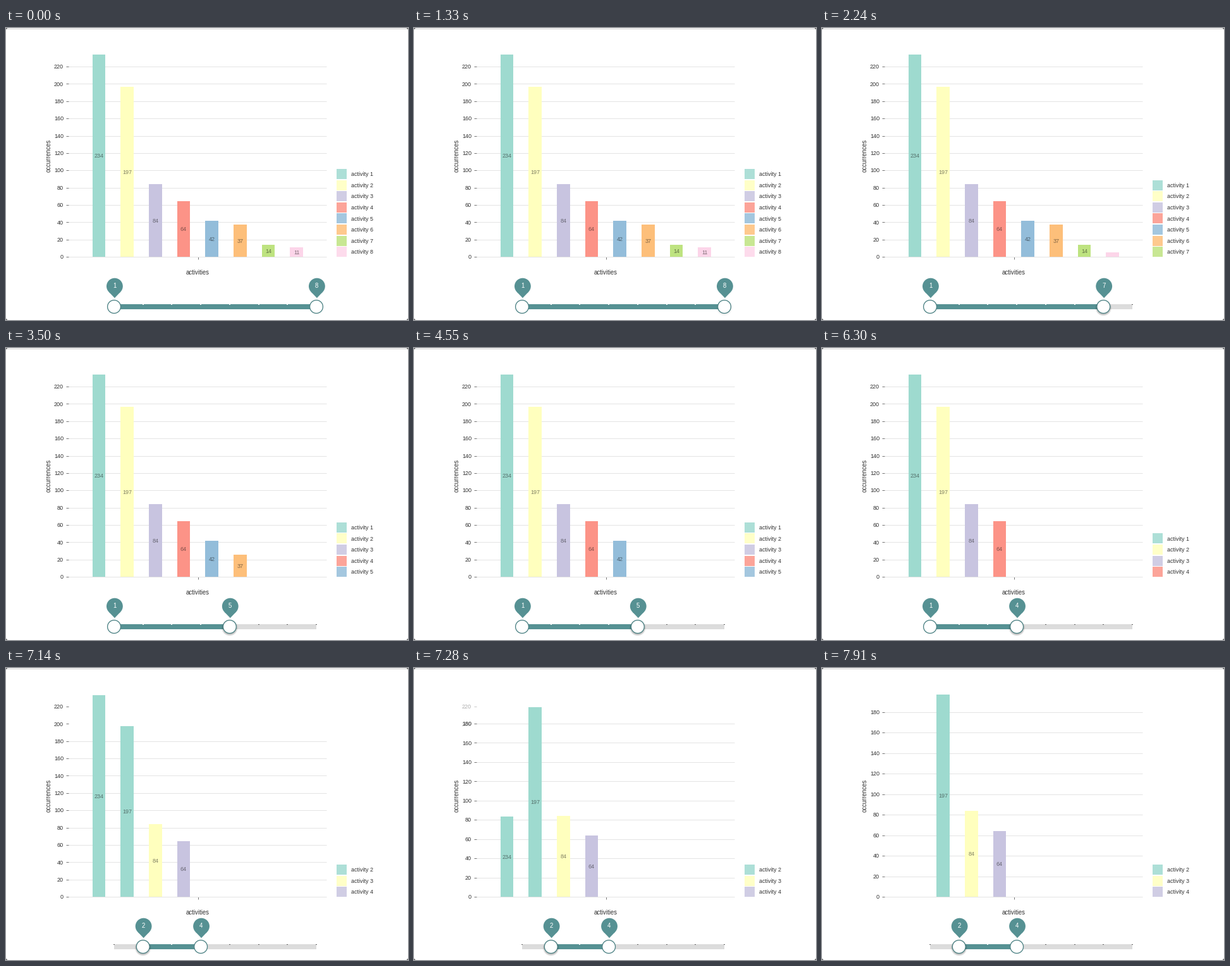
A matplotlib script that plays this animation: 636x462 px, repeating every 8 s.

```python
import matplotlib.pyplot as plt
from matplotlib.animation import FuncAnimation
from matplotlib.colors import to_rgb
from matplotlib.patches import Circle, Polygon, Rectangle

W, H, DPI = 636, 462, 64
PX = 72 / DPI
LOOP, STEP = 8000, 40
EASE_MS = 350

VALUES = [234, 197, 84, 64, 42, 37, 14, 11]
PALETTE = ["#8dd3c7", "#ffffb3", "#bebada", "#fb8072",
           "#80b1d3", "#fdb462", "#b3de69", "#fccde5"]
TEAL, TRACK, INK = "#569193", "#dcdcdc", "#333333"
BASE, PLOT_H = 362, 320
TICKS = range(0, 221, 20)

# start ms, first and last activity, delay before the bars move
EVENTS = [(-1000, 1, 8, 0), (1680, 1, 7, 379), (2590, 1, 6, 0),
          (3330, 1, 5, 0), (4550, 1, 4, 0), (4936, 1, 3, 0),
          (5870, 1, 4, 0), (7092, 2, 4, 0)]

plt.rcParams["font.family"] = "Liberation Sans"
fig = plt.figure(figsize=(W / DPI, H / DPI), dpi=DPI, facecolor="white")
ax = fig.add_axes([0, 0, 1, 1])
ax.set_xlim(0, W)
ax.set_ylim(H, 0)
ax.axis("off")


def tint(color, alpha):
    return tuple(1 - alpha * (1 - c) for c in to_rgb(color))


def ease(u):
    u = min(max(u, 0), 1)
    return 4 * u ** 3 if u < 0.5 else 1 - 4 * (1 - u) ** 3


def mix(a, b, p):
    return a + (b - a) * p


def label(x, y, s, size=9, color=INK, ha="center", z=5, **kw):
    return ax.text(x, y + 0.36 * size, s, fontsize=size * PX, color=color,
                   ha=ha, va="baseline", zorder=z, **kw)


def rect(x, y, w, h, color, z=2):
    return ax.add_patch(Rectangle((x, y), w, h, fc=color, lw=0, zorder=z))


def line(xs, ys, color, z=1):
    return ax.plot(xs, ys, color=color, lw=PX, solid_capstyle="butt", zorder=z)[0]


def knob_x(n):
    return 171 + (n - 1) * 320 / 7


class Tick:
    def __init__(self, value):
        self.value = value
        self.grid = line([99, 507], [0, 0], "#e4e4e4")
        self.mark = line([95, 99], [0, 0], "#777777")
        self.text = label(91, 0, str(value), ha="right")

    def update(self, before, after, p):
        live = self.value <= after[0]
        y = BASE - self.value * (mix(before[1], after[1], p) if live else before[1])
        alpha = 1 if live else 1 - p
        self.grid.set_ydata([y, y])
        self.grid.set_visible(live)
        self.mark.set_ydata([y, y])
        self.mark.set_alpha(alpha)
        self.text.set_y(y + 3.24)
        self.text.set_alpha(alpha)


class Bar:
    def __init__(self, i):
        self.n, self.value = i + 1, VALUES[i]
        x = 136.8 + 44.65 * i
        self.box = rect(x, BASE, 20.5, 0, "white")
        self.text = label(x + 10.3, 0, str(self.value), color="#111111", alpha=0.52)

    def update(self, old, new, s0, s1, p):
        shown0 = old[0] <= self.n <= old[1]
        shown1 = new[0] <= self.n <= new[1]
        h = mix(self.value * s0 * shown0, self.value * s1 * shown1, p)
        first = new[0] if shown1 else old[0]
        self.box.set_y(BASE - h)
        self.box.set_height(h)
        self.box.set_facecolor(tint(PALETTE[max(self.n - first, 0)], 0.85))
        self.text.set_y(BASE - h / 2 + 3.24)
        self.text.set_visible(h > 10)


class Knob:
    def __init__(self):
        self.shadow = [self.disc(r, "black", 6, alpha=0.07, lw=0)
                       for r in (12.8, 12, 11.2, 10.4)]
        self.ring = self.disc(10.4, "white", 7, ec="#4b8183", lw=1.3 * PX)
        self.bulb = self.disc(12.9, TEAL, 7, lw=0)
        self.tip = ax.add_patch(Polygon([(0, 0)] * 3, fc=TEAL, lw=0, zorder=7))
        self.text = label(0, 407.8, "", size=9.6, color="white", z=8)

    @staticmethod
    def disc(r, color, z, **kw):
        return ax.add_patch(Circle((0, 0), r, fc=color, zorder=z, **kw))

    def update(self, n, press):
        x = knob_x(n)
        for s in self.shadow:
            s.center = x, 442.7
            s.set_alpha(0.07 * press)
        self.ring.center = x, 441
        px = x + 0.9
        self.bulb.center = px, 408.6
        self.tip.set_xy([(px - 9.12, 417.7), (px + 9.12, 417.7), (px, 427.2)])
        self.text.set_x(px - 0.4)
        self.text.set_text(str(n))


# window edge
line([0, W], [0.5, 0.5], "#d0d0d0")
for cx, dx in ((0, 1), (W, -1)):
    for cy, dy in ((0, 1), (H, -1)):
        ax.add_patch(Polygon([(cx, cy), (cx + 2.5 * dx, cy), (cx, cy + 2.5 * dy)],
                             fc="#666666", lw=0, zorder=2))

# fixed axis parts
line([303.9, 303.9], [362, 366], "#777777")
label(303, 387, "activities", size=9.6)
ax.text(70.3, 202, "occurrences", fontsize=9.6 * PX, color=INK, rotation=90,
        rotation_mode="anchor", ha="center", va="baseline")

ticks = [Tick(v) for v in TICKS]
bars = [Bar(i) for i in range(8)]

legend = []
for row in range(8):
    cy = 354.2 - 17.6 * row
    legend.append((rect(523, cy - 8, 16, 16, "white"),
                   label(545.5, cy, "", size=8.9, ha="left")))

rect(171, 437, 320, 8, TRACK)
active = rect(171, 437, 320, 8, TEAL, 3)
stops = [rect(knob_x(n) - 1, 436.6, 2, 1.2, "white", 4) for n in range(1, 9)]
left, right = Knob(), Knob()


def chart_state(t):
    started = [e for e in EVENTS if e[0] + e[3] <= t]
    new = started[-1]
    old = started[-2] if len(started) > 1 else new
    p = ease((t - new[0] - new[3]) / EASE_MS)
    return old[1:3], new[1:3], p


def scale(first):
    top = VALUES[first - 1]
    return top, PLOT_H / top


def draw(i):
    t = i * STEP
    old, new, p = chart_state(t)
    before, after = scale(old[0]), scale(new[0])
    for tick in ticks:
        tick.update(before, after, p)
    for bar in bars:
        bar.update(old, new, before[1], after[1], p)

    lo, hi = [e for e in EVENTS if e[0] <= t][-1][1:3]
    for row, (box, text) in enumerate(legend):
        n = hi - row
        shown = n >= lo
        box.set_visible(shown)
        text.set_visible(shown)
        if shown:
            box.set_facecolor(tint(PALETTE[n - lo], 0.72))
            text.set_text(f"activity {n}")

    active.set_x(knob_x(lo))
    active.set_width(knob_x(hi) - knob_x(lo))
    for n, stop in enumerate(stops, 1):
        stop.set_facecolor("white" if lo <= n <= hi else "#666666")
    press_r = min(max((t - 1300) / 100, 0), 1) * min(max((6650 - t) / 100, 0), 1)
    press_l = min(max((t - 6690) / 100, 0), 1)
    left.update(lo, press_l)
    right.update(hi, press_r)
    return []


anim = FuncAnimation(fig, draw, frames=LOOP // STEP, interval=STEP,
                     init_func=lambda: draw(0), repeat=True, repeat_delay=0)
plt.show()
```
